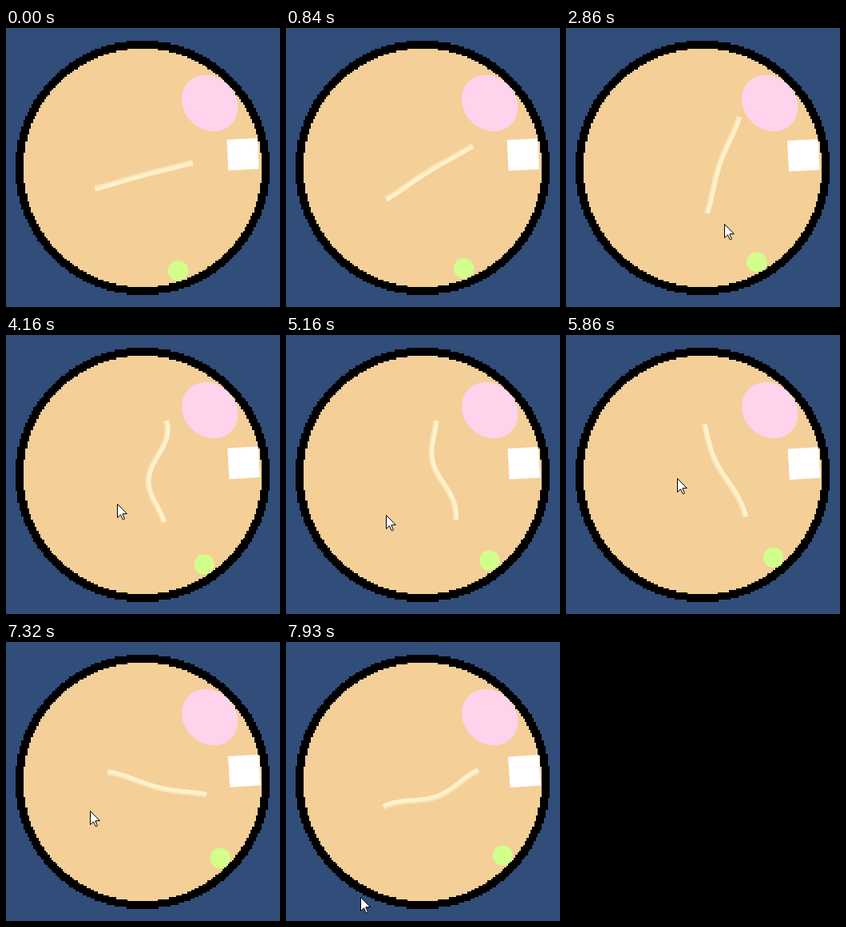
Recreate the animation shown at these times as an HTML page with a canvas. Size 343 by 349 pixels, loop 8000 ms.

```html
<!DOCTYPE html>
<html lang="en">
<head>
<meta charset="utf-8">
<title>Rope in a ring</title>
<style>
html, body { margin: 0; width: 100%; height: 100%; overflow: hidden; background: #314d79; }
canvas { display: block; width: 100vw; height: 100vh; }
</style>
</head>
<body>
<canvas width="343" height="349"></canvas>
<script>
const ctx = document.querySelector('canvas').getContext('2d');
const LOOP = 8000, TICKS = 104;
const CENTER = { x: 171, y: 174.9 };
const ROPE_LENGTH = 127;
const rad = degrees => degrees * Math.PI / 180;

// tick, centre x, centre y, angle in degrees, bow, wave
const ropePoses = [
  [0, 172.5, 184.5, 15, 1, 0],
  [37, 196.5, 171.5, 71.3, 4.7, 0],
  [54, 199, 170.5, 88.7, 19, 6.5],
  [67, 200, 169.5, 101, 12, -6],
  [86, 197.5, 169.5, 128.6, -3, 0],
  [103, 181.5, 183.5, 201, 12, 1.5]
];

// tick, x, y
const cursorPath = [
  [31, 200, 340], [37, 198, 245], [48, 136, 215], [54, 139, 211], [64, 93, 230],
  [67, 125, 225], [86, 155, 128], [97, 94, 230], [103, 93, 319]
];

function sample(keys, tick) {
  const next = Math.max(1, keys.findIndex(key => key[0] >= tick));
  const [start, ...from] = keys[next - 1], [end, ...to] = keys[next];
  const k = (tick - start) / (end - start);
  return from.map((v, i) => v + (to[i] - v) * k);
}

// A disc made of coarse square cells.
function blockyDisc(radius, color, cells = 128) {
  const size = 2 * radius / cells;
  ctx.fillStyle = color;
  for (let row = 0; row < cells; row++) {
    const dy = row + 0.5 - cells / 2;
    const half = Math.round(Math.sqrt(cells * cells / 4 - dy * dy)) * size;
    const top = Math.round(CENTER.y - radius + row * size);
    const bottom = Math.round(CENTER.y - radius + (row + 1) * size);
    const left = Math.round(CENTER.x - half), right = Math.round(CENTER.x + half);
    ctx.fillRect(left, top, right - left, bottom - top);
  }
}

function ellipse(x, y, rx, ry, angle, color) {
  ctx.fillStyle = color;
  ctx.beginPath();
  ctx.ellipse(x, y, rx, ry, angle, 0, 2 * Math.PI);
  ctx.fill();
}

// The ball rolls along the inside of the ring, slowing a little.
function drawBall(seconds) {
  const angle = rad(71 - 3.9 * seconds + 0.04 * seconds ** 2);
  const x = 171 + 136.4 * Math.cos(angle), y = 174.5 + 136.4 * Math.sin(angle);
  ellipse(x, y, 12.7, 12.7, 0, '#d2ff8b');
}

function drawBox(progress) {
  ctx.save();
  ctx.translate(296.6 + 1.9 * progress, 158 + 3.5 * progress);
  ctx.rotate(-0.048 - 0.014 * progress);
  ctx.fillStyle = '#fff';
  ctx.fillRect(-19.3, -19.3, 38.6, 38.6);
  ctx.restore();
}

function drawRope([x, y, angle, bow, wave]) {
  ctx.save();
  ctx.translate(x, y);
  ctx.rotate(-rad(angle));
  const strand = (width, offset, color) => {
    ctx.beginPath();
    for (let s = 0; s <= 1; s += 1 / 16) {
      const bend = bow * Math.sin(Math.PI * s) ** 2 + wave * Math.sin(2 * Math.PI * s);
      ctx.lineTo((s - 0.5) * ROPE_LENGTH, offset - bend);
    }
    ctx.lineWidth = width;
    ctx.strokeStyle = color;
    ctx.stroke();
  };
  strand(7.2, 0, '#f8e2b2');
  strand(4.8, 1, '#fff1cb');
  ctx.restore();
}

function drawCursor([x, y]) {
  ctx.save();
  ctx.translate(Math.round(x) + 0.5, Math.round(y) + 0.5);
  ctx.fillStyle = '#fff';
  ctx.strokeStyle = '#000';
  const arrow = new Path2D('M0 0V17L4 13.3 6.8 19.3 9 18.3 6.3 12.3 11.8 12Z');
  ctx.fill(arrow);
  ctx.stroke(arrow);
  ctx.restore();
}

function draw(now) {
  const tick = Math.floor((now % LOOP) / LOOP * TICKS + 0.2) % TICKS;
  ctx.fillStyle = '#314d79';
  ctx.fillRect(0, 0, 343, 349);
  blockyDisc(159, '#000');
  blockyDisc(149, '#f4cf98');
  ellipse(255.2, 94.2, 37.6, 32.6, Math.PI / 4, '#ffd3ec');
  drawBox(tick / TICKS);
  drawBall(tick / TICKS * LOOP / 1000);
  drawRope(sample(ropePoses, tick));
  if (tick >= cursorPath[0][0]) drawCursor(sample(cursorPath, tick));
}

const start = performance.now();
function animate() {
  draw(performance.now() - start);
  requestAnimationFrame(animate);
}
animate();
</script>
</body>
</html>
```
